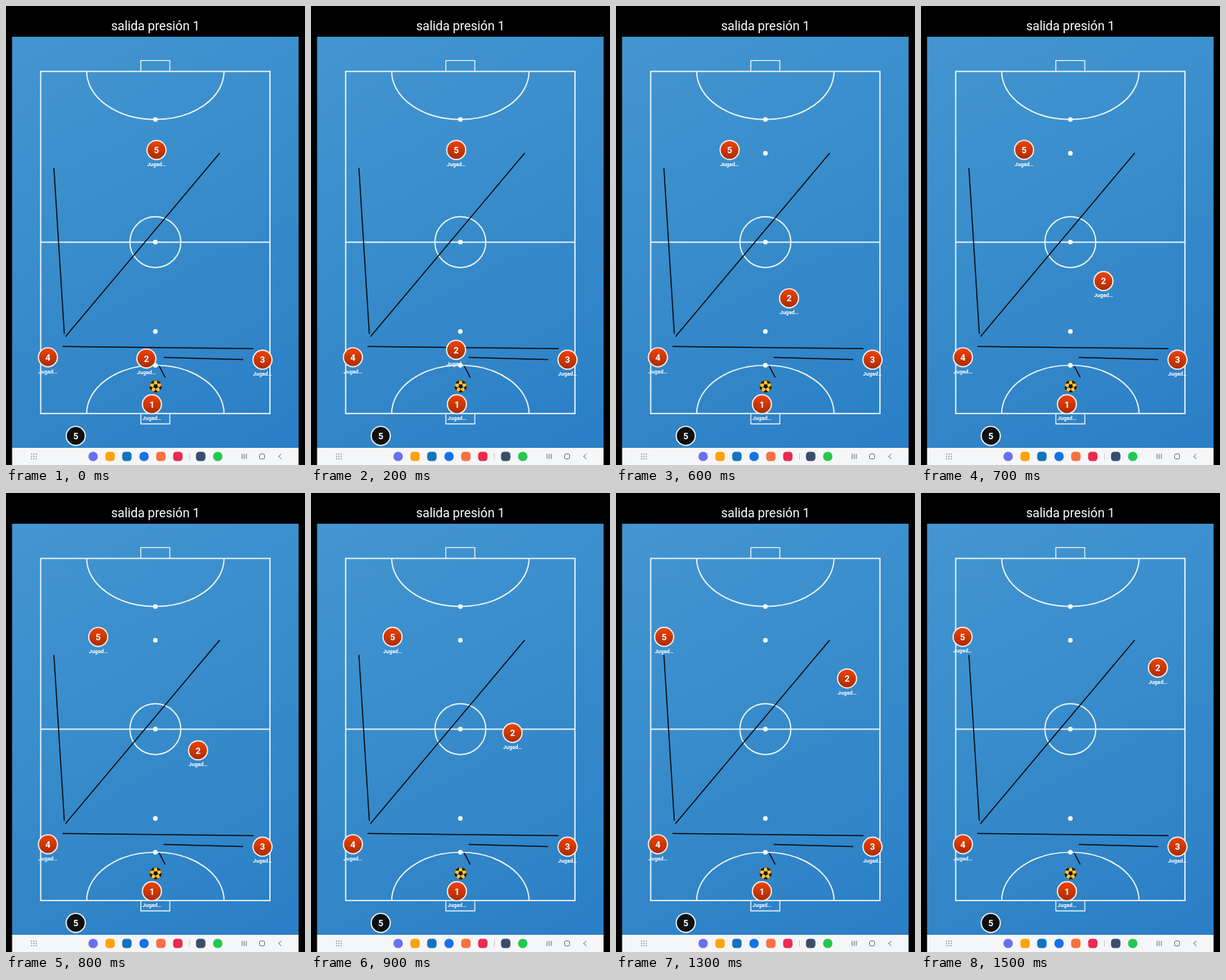
Recreate the animation shown at these times as an HTML page. Size 418 by 642 pixels, loop 1.6 s.

```html
<!DOCTYPE html>
<html lang="es">
<head>
<meta charset="utf-8">
<title>salida presión 1</title>
<style>
  html, body { margin: 0; width: 100%; height: 100%; overflow: hidden; background: #000; }
  svg { display: block; width: 418px; height: 642px; }
  text { font-family: Roboto, sans-serif; fill: #fff; text-anchor: middle; }
  .title { font-size: 17.7px; }
  .num { font-size: 12.5px; font-weight: 700; }
  .label { font-size: 7.5px; font-weight: 700; }
  .pitch { fill: none; stroke: #f2f8fc; stroke-width: 1.7; }
  .run { stroke: #05080c; stroke-width: 1.5; stroke-linecap: round; }
  .nav { fill: none; stroke: #666a70; stroke-width: 1; }
</style>
</head>
<body>
<svg viewBox="0 0 418 642">
  <defs>
    <linearGradient id="court" gradientUnits="userSpaceOnUse" x1="60" y1="43" x2="360" y2="618">
      <stop offset="0" stop-color="#4295d0"/>
      <stop offset=".5" stop-color="#378bca"/>
      <stop offset="1" stop-color="#2b7fc6"/>
    </linearGradient>
    <linearGradient id="red" x2="0" y2="1">
      <stop offset="0" stop-color="#ee4308"/>
      <stop offset="1" stop-color="#a92b02"/>
    </linearGradient>
    <clipPath id="ballClip"><circle r="8.6"/></clipPath>
  </defs>

  <text class="title" x="209" y="34.3">salida presión 1</text>
  <rect x="8.5" y="43" width="400.5" height="575" fill="url(#court)"/>

  <g class="pitch">
    <rect x="48.5" y="91.5" width="320.5" height="478.5"/>
    <path d="M48.5 330.3H369"/>
    <circle cx="208.8" cy="330.3" r="35.6"/>
    <path d="M112.8 91.5A96 67.2 0 0 0 304.8 91.5M112.8 570A96 67.5 0 0 1 304.8 570"/>
    <path d="M188.5 91.5V76.3H229V91.5M188.5 570V584.5H229V570" stroke-width="1.3"/>
  </g>
  <g id="spots" fill="#fff"></g>
  <g id="runs" class="run"></g>

  <g transform="translate(209.2 532)">
    <circle r="8.6" fill="#fcc438"/>
    <g id="patches" clip-path="url(#ballClip)" fill="#15130f"></g>
    <circle r="8.3" fill="none" stroke="#4b3b16" stroke-width=".6"/>
  </g>

  <g id="players"></g>

  <rect x="8.5" y="618" width="400.5" height="24" fill="#f5f6f8"/>
  <g id="apps"></g>
  <path d="M256.5 625.5V634.5" stroke="#c9ccd0"/>
  <g class="nav">
    <path d="M330 626.5V633.5M333 626.5V633.5M336 626.5V633.5"/>
    <rect x="354.5" y="626.5" width="7" height="7" rx="2"/>
    <path d="M385 626.5L381 630L385 633.5"/>
  </g>
</svg>
<script>
const LOOP = 1600, STEP = 100;
const byId = id => document.getElementById(id);

function add(parent, tag, attrs, text) {
  const node = document.createElementNS('http://www.w3.org/2000/svg', tag);
  for (const key in attrs) node.setAttribute(key, attrs[key]);
  if (text) node.textContent = text;
  return parent.appendChild(node);
}

for (const cy of [158.7, 206, 330.3, 455.2, 502.5]) {
  add(byId('spots'), 'circle', { cx: 208.8, cy, r: 3.2 });
}

for (const [x1, y1, x2, y2] of [
  [67, 227, 81.5, 458], [83.5, 462, 298.5, 206], [79.5, 476.3, 345.5, 479.3],
  [221, 491.6, 331, 494.4], [214.5, 504, 222.3, 519]
]) add(byId('runs'), 'line', { x1, y1, x2, y2 });

// Ball: one central pentagon and five around the rim
function pentagon(cx, cy, r, turn) {
  const points = [0, 1, 2, 3, 4].map(i => {
    const a = turn + i * Math.PI * 0.4;
    return [cx + r * Math.cos(a), cy + r * Math.sin(a)];
  });
  add(byId('patches'), 'polygon', { points: points.join(' ') });
}
pentagon(0, 0, 3.3, 0.3);
for (let i = 0; i < 5; i++) {
  const a = 0.3 + i * Math.PI * 0.4;
  pentagon(8.1 * Math.cos(a), 8.1 * Math.sin(a), 3.2, a + Math.PI);
  add(byId('patches'), 'path', {
    d: `M0 0L${6 * Math.cos(a)} ${6 * Math.sin(a)}`, stroke: '#15130f', 'stroke-width': 0.6
  });
}

function player(num, x, y, label = 'Jugad…', fill = 'url(#red)') {
  const g = add(byId('players'), 'g', {});
  add(g, 'circle', { r: 13.3, fill, stroke: '#f6f3f0', 'stroke-width': 1.7 });
  add(g, 'text', { class: 'num', y: 4.6 }, num);
  if (label) add(g, 'text', { class: 'label', y: 22.3 }, label);
  const place = (px, py) => g.setAttribute('transform', `translate(${px} ${py})`);
  place(x, y);
  return place;
}

player('1', 204, 557);
player('3', 358.6, 494.7);
player('4', 58.6, 491.3);
player('5', 97.5, 601.3, '', '#0d0f10');
const movers = [
  { place: player('2', 196.2, 493.2), from: [196.2, 493.2], to: [331.6, 243.5] },
  { place: player('5', 210.5, 201.4), from: [210.5, 201.4], to: [57.7, 201.2] }
];

// Taskbar
const apps = byId('apps');
for (let i = 0; i < 9; i++) {
  add(apps, 'circle', { cx: 35.7 + i % 3 * 3.3, cy: 626.7 + Math.floor(i / 3) * 3.3, r: 0.8, fill: '#686c72' });
}
for (const [x, fill, round] of [
  [121.8, '#6a70ee', 1], [145.5, '#ffa20d'], [169, '#1274bd'], [193, '#1672e8', 1],
  [216.5, '#fa7042'], [240.2, '#ec294f'], [272.2, '#3b4d6d'], [296, '#25c751', 1]
]) {
  add(apps, 'rect', { x: x - 6.6, y: 623.4, width: 13.2, height: 13.2, rx: round ? 6.6 : 4.5, fill });
}

function draw(now) {
  const t = Math.floor(now % LOOP / STEP) * STEP;
  const p = (1 - Math.cos(Math.PI * Math.min(1, (t + 24) / 1580))) / 2;
  for (const { place, from, to } of movers) {
    place(...from.map((v, i) => v + (to[i] - v) * p));
  }
}

const start = performance.now();
function tick() {
  draw(performance.now() - start);
  requestAnimationFrame(tick);
}
draw(0);
requestAnimationFrame(tick);
</script>
</body>
</html>
```
